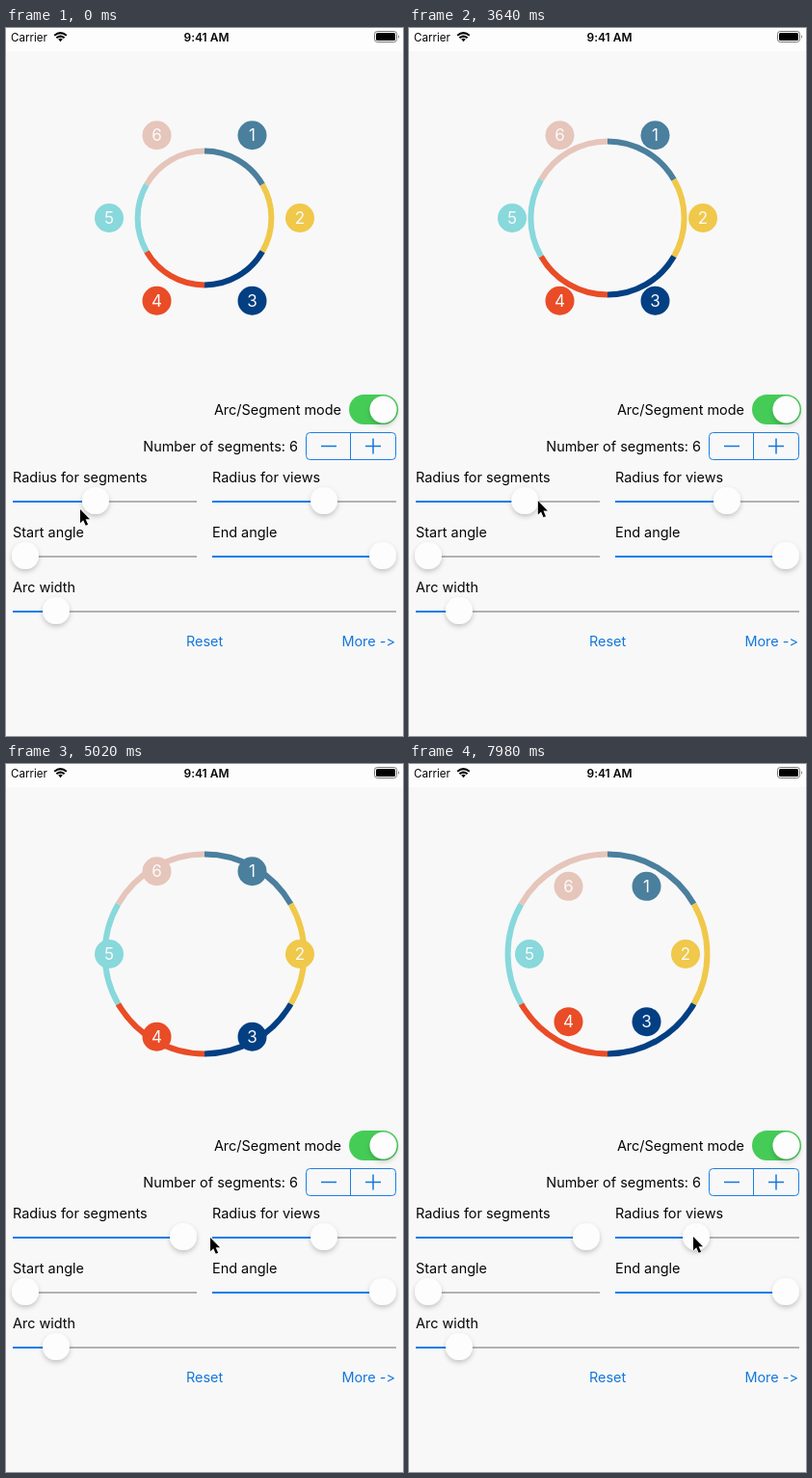
Write an HTML page that moves like this. It is 412 by 734 pixels and loops after 8 s.

```html
<!DOCTYPE html>
<html lang="en">
<head>
<meta charset="utf-8">
<title>Segment control demo</title>
<style>
  html, body { margin: 0; width: 100%; height: 100%; overflow: hidden; background: #f8f8f8; }
  svg { display: block; width: 412px; height: 734px; }
  text { font: 14.45px Inter, Roboto, sans-serif; fill: #050505; font-feature-settings: "calt" 0; }
  .status { font-size: 11.6px; }
  .clock { font-size: 12px; font-weight: 600; }
  .digit { font-size: 17px; fill: #fafafa; text-anchor: middle; }
  .end { text-anchor: end; }
  .link { fill: #1477dc; }
  .outline { fill: none; stroke: #1c7fe2; }
  .sign { stroke: #1477dc; stroke-width: 1.5; }
  .track { stroke: #b2b2b2; stroke-width: 2; }
  .filled { stroke: #0f7deb; stroke-width: 2; }
  .thumb { fill: #fdfdfd; filter: url(#shadow); }
</style>
</head>
<body>
<svg id="stage" viewBox="0 0 412 734">
  <defs>
    <filter id="shadow" x="-50%" y="-50%" width="200%" height="200%">
      <feDropShadow dx="0" dy="2.5" stdDeviation="2.5" flood-color="#000" flood-opacity=".22"/>
    </filter>
  </defs>
  <rect width="412" height="734" fill="#f8f8f8"/>

  <!-- Status bar -->
  <rect width="412" height="24" fill="#fdfdfd"/>
  <text class="status" x="5" y="14">Carrier</text>
  <g fill="none" stroke="#000" stroke-width="2">
    <path d="M50.2 7.7Q56.5 2.5 62.8 7.7M52.4 10.3Q56.5 7 60.6 10.3"/>
    <path d="M54.2 11.6Q56.5 9.8 58.8 11.6L56.5 14.2z" fill="#000" stroke="none"/>
  </g>
  <text class="clock" x="208" y="14" text-anchor="middle">9:41 AM</text>
  <rect x="382.5" y="3.5" width="23" height="11" rx="2.8" fill="none" stroke="#777"/>
  <rect x="384" y="5" width="20" height="8" rx="1.5"/>
  <path d="M407 7q2 2 0 4z" fill="#777"/>

  <g id="ring" fill="none" stroke-width="6"></g>
  <g id="badges"></g>

  <text class="end" x="348" y="401">Arc/Segment mode</text>
  <rect x="356" y="380" width="51" height="31" rx="15.5" fill="#45cc57"/>
  <circle class="thumb" cx="391.5" cy="395.5" r="14"/>

  <text class="end" x="303" y="439">Number of segments: 6</text>
  <rect class="outline" x="311.5" y="419.5" width="93" height="28" rx="4"/>
  <path class="outline" d="M357.5 419.5v28"/>
  <path class="sign" d="M327 433.5h16M373 433.5h16M381 425.5v16"/>

  <g id="sliders"></g>

  <text class="link" x="187" y="640.5">Reset</text>
  <text class="link end" x="404" y="640.5">More -&gt;</text>

  <path id="cursor" d="M0 0V14.2L3.2 11.2L5.7 16.8L8.1 15.8L5.6 10.2H10z"
        stroke="#fafafa" stroke-width="1" paint-order="stroke"/>
</svg>
<script>
const LOOP = 8000, CENTER_X = 206, CENTER_Y = 197;
const COLORS = ['#4a7f9d', '#f0c84a', '#033f83', '#e94c26', '#88d8dc', '#e6c5bb'];
const byId = id => document.getElementById(id);

function add(parent, tag, attributes, content = '') {
  const node = document.createElementNS('http://www.w3.org/2000/svg', tag);
  for (const name in attributes) node.setAttribute(name, attributes[name]);
  node.textContent = content;
  return parent.appendChild(node);
}

function polar(radius, degrees) {
  const angle = degrees * Math.PI / 180;
  return [CENTER_X + radius * Math.cos(angle), CENTER_Y + radius * Math.sin(angle)];
}

function makeSlider(label, left, right, y, start) {
  const group = byId('sliders');
  add(group, 'text', { x: left, y: y - 20.5 }, label);
  add(group, 'path', { class: 'track', d: `M${left} ${y}H${right}` });
  const filled = add(group, 'path', { class: 'filled' });
  const thumb = add(group, 'circle', { class: 'thumb', cy: y - 1, r: 14 });
  const set = x => {
    filled.setAttribute('d', `M${left} ${y}H${x}`);
    thumb.setAttribute('cx', x);
  };
  set(start);
  return set;
}

const setSegments = makeSlider('Radius for segments', 7, 198, 491, 93);
const setViews = makeSlider('Radius for views', 214, 405, 491, 330);
makeSlider('Start angle', 7, 198, 548, 20);
makeSlider('End angle', 214, 405, 548, 391);
makeSlider('Arc width', 7, 405, 605, 52);

const arcs = COLORS.map(stroke => add(byId('ring'), 'path', { stroke }));
const badges = COLORS.map((fill, i) => {
  const badge = add(byId('badges'), 'g', {});
  add(badge, 'circle', { r: 15, fill });
  add(badge, 'text', { class: 'digit', y: 6.2 }, i + 1);
  return badge;
});

// Keys are [time, value] pairs joined by straight lines.
function track(keys, time) {
  const next = keys.findIndex(key => key[0] > time);
  if (next === 0) return keys[0][1];
  if (next < 0) return keys[keys.length - 1][1];
  const [t0, a] = keys[next - 1], [t1, b] = keys[next];
  return a + (b - a) * (time - t0) / (t1 - t0);
}

const cursorX = [[200, 77], [1200, 95], [2750, 95], [3100, 101], [4080, 160.5],
  [5020, 212], [6140, 267], [6800, 331], [7100, 331], [7900, 295]];
const cursorY = [[200, 499], [1200, 489.5], [4080, 490.5], [5020, 491], [6140, 489], [7900, 490]];
const segmentThumb = [[2850, 93], [3100, 96], [4080, 140], [4900, 184]];
const viewThumb = [[7200, 330], [7960, 298]];

function draw(time) {
  const segmentX = track(segmentThumb, time), viewX = track(viewThumb, time);
  const ringRadius = 69.4 + (segmentX - 93) * 0.374;
  const viewRadius = 99 + (viewX - 330) * 0.5625;
  setSegments(segmentX);
  setViews(viewX);
  COLORS.forEach((_, i) => {
    const from = polar(ringRadius, i * 60 - 90), to = polar(ringRadius, i * 60 - 30);
    arcs[i].setAttribute('d', `M${from}A${ringRadius} ${ringRadius} 0 0 1 ${to}`);
    badges[i].setAttribute('transform', `translate(${polar(viewRadius, i * 60 - 60)})`);
  });
  byId('cursor').setAttribute('transform',
    `translate(${track(cursorX, time)} ${track(cursorY, time)})`);
}

function tick() {
  draw(performance.now() % LOOP);
  requestAnimationFrame(tick);
}
tick();
</script>
</body>
</html>
```
